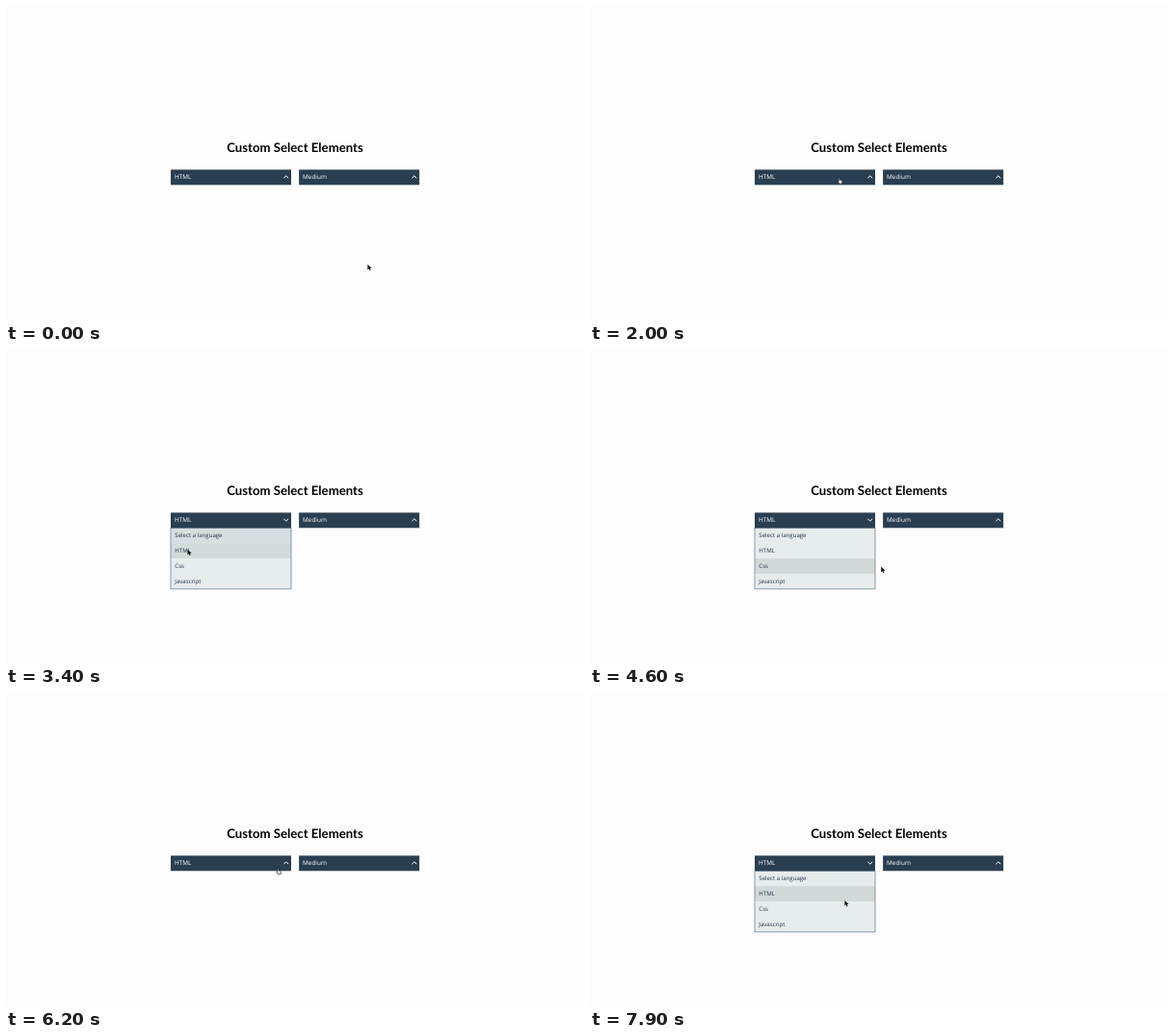
Write an HTML page that moves like this. It is 600 px wide and 328 px high and loops after 8 s.

```html
<!DOCTYPE html>
<html lang="en">
<head>
<meta charset="utf-8">
<title>Custom Select Elements</title>
<style>
html, body { margin: 0; width: 100%; height: 100%; overflow: hidden; background: #fdfdfd; }
svg { display: block; width: 600px; height: 328px; }
text { font: 500 6.1px "Open Sans", "Noto Sans", sans-serif; fill: #1f3447; text-rendering: geometricPrecision; }
.title { font: 700 13.2px Lato, "Open Sans", sans-serif; fill: #000; text-anchor: middle; }
.head { fill: #2a3e51; }
.label { font-size: 6.4px; fill: #fff; }
.chevron { fill: none; stroke: #fff; stroke-width: 1; }
.row { fill: #d1d9db; }
.frame { fill: none; stroke: #5c7488; stroke-width: .7; }
</style>
</head>
<body>
<svg viewBox="0 0 600 328">
  <text class="title" x="300" y="152.2">Custom Select Elements</text>
  <g id="list"></g>
  <g id="heads"></g>
  <path id="arrow" d="M.4 .9v5.8l1.3-1.1 .9 2 1-.5-.9-1.8 1.8-.2z" fill="#111"/>
  <path id="hand" d="M1.2.6Q2 .2 2.2 1V3L4.2 3.5Q5 3.8 4.9 4.8L4.4 7.2H1.8L.3 4.8Q.2 4 1.2 4.4Z" fill="#e2dcdd" stroke="#14181c" stroke-width=".6"/>
</svg>
<script>
const LOOP = 8000, STEP = 100, FADE = 400, LAG = 300;
const LEFT = 171, WIDTH = 125, TOP = 186.3, PITCH = 15.9;
const options = ['Select a language', 'HTML', 'Css', 'Javascript'];
const visits = [[2050, 4700], [6550, Infinity]]; // list opens, closes

// The pointer rests between moves: start, end, x, y
const home = [375, 268];
const moves = [
  [130, 500, 326, 247], [1140, 2000, 257, 178],
  [2500, 2900, 255, 192], [2900, 3350, 182, 206], [3350, 3900, 249, 225],
  [4450, 4660, 323, 226], [5400, 6250, 278, 180], [6850, 7900, 264, 216]
];

const $ = id => document.getElementById(id);
const clamp = v => Math.max(0, Math.min(1, v));
const ease = v => 1 - (1 - clamp(v)) ** 2.4;

const box = (cls, y, height, x = LEFT) =>
  `<rect class="${cls}" x="${x}" y="${y}" width="${WIDTH}" height="${height}"/>`;

const turn = (x, angle) => `translate(${x + 119.7} 178) rotate(${angle})`;

const head = (x, label) => box('head', 170.4, 15.9, x) + `
  <text class="label" x="${x + 4}" y="180.2">${label}</text>
  <path class="chevron" d="M-2.4 1.2L0 -1.2 2.4 1.2" transform="${turn(x, 0)}"/>`;

$('heads').innerHTML = head(LEFT, 'HTML') + head(304.1, 'Medium');
$('list').innerHTML =
  `<g fill="#e7eced">${box('', TOP, 4 * PITCH)}</g>` +
  options.map((name, i) => box('row', TOP + i * PITCH, PITCH) +
    `<text x="${LEFT + 4.3}" y="${196 + i * PITCH}">${name}</text>`).join('') +
  box('frame', TOP, 4 * PITCH);

const rows = document.querySelectorAll('.row');
const chevron = document.querySelector('.chevron');

function pointer(t) {
  return moves.reduce(([x, y], [start, end, toX, toY]) => {
    const k = clamp((t - start) / (end - start));
    return [x + (toX - x) * k, y + (toY - y) * k];
  }, home);
}

// Row under the pointer; -1 is the select's head
function rowAt([x, y]) {
  return x >= LEFT && x <= LEFT + WIDTH && y >= 170 ? Math.floor((y - TOP) / PITCH) : NaN;
}

// Hover colour lags behind the pointer
function glow(row, t) {
  let sum = 0;
  for (let lag = 0; lag < LAG; lag += 20) sum += 20 * (rowAt(pointer(t - lag)) === row);
  return ease(sum / LAG);
}

function draw(now) {
  const t = Math.floor(now % LOOP / STEP) * STEP;
  const open = visits.reduce((v, [a, b]) =>
    v + ease((t - a) / FADE) - ease((t - b) / FADE), 0);
  $('list').setAttribute('opacity', open);
  chevron.setAttribute('transform', turn(LEFT, 180 * open));
  rows.forEach((row, i) => row.setAttribute('opacity', glow(i, t)));

  const at = pointer(t), onHead = rowAt(at) === -1;
  for (const id of ['arrow', 'hand']) {
    $(id).setAttribute('transform', `translate(${at})`);
    $(id).setAttribute('visibility', onHead === (id === 'hand') ? 'visible' : 'hidden');
  }
  requestAnimationFrame(() => draw(performance.now()));
}
draw(performance.now());
</script>
</body>
</html>
```
